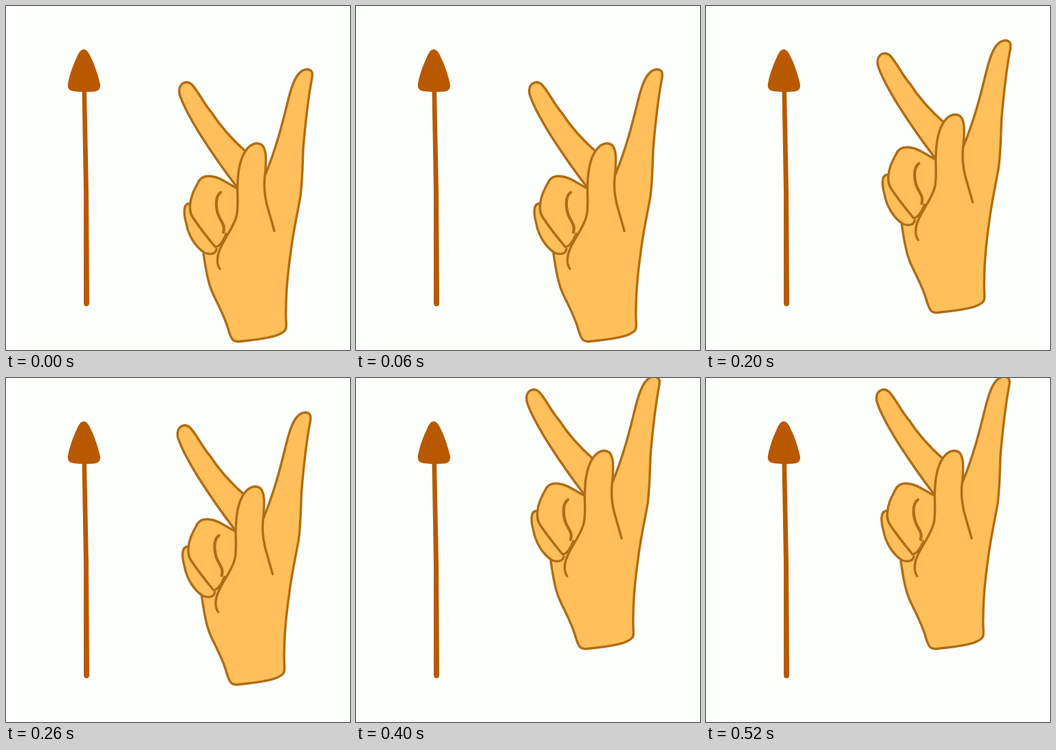
These frames come from a looping animation (500x500 px, 0.6 s). An HTML page with a canvas:

```html
<!DOCTYPE html>
<html lang="en">
<head>
<meta charset="utf-8">
<title>Hand and arrow</title>
<style>
  html, body { margin: 0; width: 100%; height: 100%; overflow: hidden; background: #fdfffd; }
  canvas { display: block; }
</style>
</head>
<body>
<canvas id="stage" width="500" height="500"></canvas>
<script>
const ctx = document.getElementById('stage').getContext('2d');
const SKIN = '#ffbf5a', OUTLINE = '#b06d14', ARROW = '#b85900';
const LOOP = 600, STEP = 100;

// Hand offset for each step; the last one is held until the loop restarts.
const OFFSETS = [[0, 0], [-2, -22], [-2.5, -42], [-2.5, -68], [-4, -94]];

const hand = [
  { // raised finger on the left
    path: 'M337 265C317 239 299 213 283 188C270 167 256 142 252 127C250 112 262 107 270 114C281 126 288 143 299 155C313 177 331 196 349 212'
  },
  { // palm and raised finger on the right
    path: 'M377 245C393 206 402 170 410 137C416 113 423 93 437 92C446 92 446 99 444.5 106C439 135 435 172 432 207C431 232 431 252 428 276C424 300 417 330 414 357C410 385 407 415 407 440C406 453 408 461 407 468C405 481 365 485 340 487.5C329 489 327 482 324 473C318 450 306 431 299 414C292 398 290 378 287 360',
    close: 'L306 352L336 270L350 225L376 220Z'
  },
  { // little finger
    path: 'M267 287C257 287 258 302 262 316C265 333 275 350 289 359C298 362 305 360 306 353',
    close: 'L304 350L269 304Z'
  },
  { // curled finger
    path: 'M336 265C322 258 312 249 298 247.5C288 246 282 250 279 257C273 268 268 278 267.5 290C267 298 269 304 272 308C282 323 294 338 304 350C309 351 316 342 320 331',
    close: 'C328 318 336 310 337 300Z'
  },
  { // thumb
    path: 'M311 382C305 375 307 361 312 351C320 334 333 318 335.5 303C338 288 336 275 336.5 262C337 237 341 221 348 211C354 201 364 197 372 202C379 209 378 224 377 240C374 262 376 275 379 288C383 303 387 315 390 327'
  }
].map(({ path, close = '' }) => ({ line: new Path2D(path), area: new Path2D(path + close) }));

const crease = new Path2D('M312 271C303 277 305 296 310 307C314 315 319 320 316 329');
const arrowHead = new Path2D('M113 63C119 63 122 72 126 80C131 92 135 105 137 115C137 122 133 124 127 124.5Q113 125.5 99 124C92 123 89 120 90 113C92 102 96 90 100 81C104 72 107 63 113 63Z');
const shaft = new Path2D('M110.5 122L117 122L120 270L121 432C121 438 113 438 113 432L113 270Z');

function drawHand([x, y]) {
  ctx.save();
  ctx.translate(x, y);
  ctx.lineCap = ctx.lineJoin = 'round';
  ctx.lineWidth = 3.4;
  ctx.strokeStyle = OUTLINE;
  ctx.fillStyle = SKIN;
  for (const { line, area } of hand) {
    ctx.fill(area);
    ctx.stroke(line);
  }
  ctx.lineWidth = 4.2;
  ctx.stroke(crease);
  ctx.restore();
}

function draw(time) {
  const step = Math.floor((time % LOOP) / STEP);
  ctx.fillStyle = '#fdfffd';
  ctx.fillRect(0, 0, 500, 500);
  ctx.fillStyle = ARROW;
  ctx.fill(shaft);
  ctx.fill(arrowHead);
  drawHand(OFFSETS[Math.min(step, OFFSETS.length - 1)]);
}

let start;
function tick(now) {
  start ??= now;
  draw(now - start);
  requestAnimationFrame(tick);
}
draw(0);
requestAnimationFrame(tick);
</script>
</body>
</html>
```
